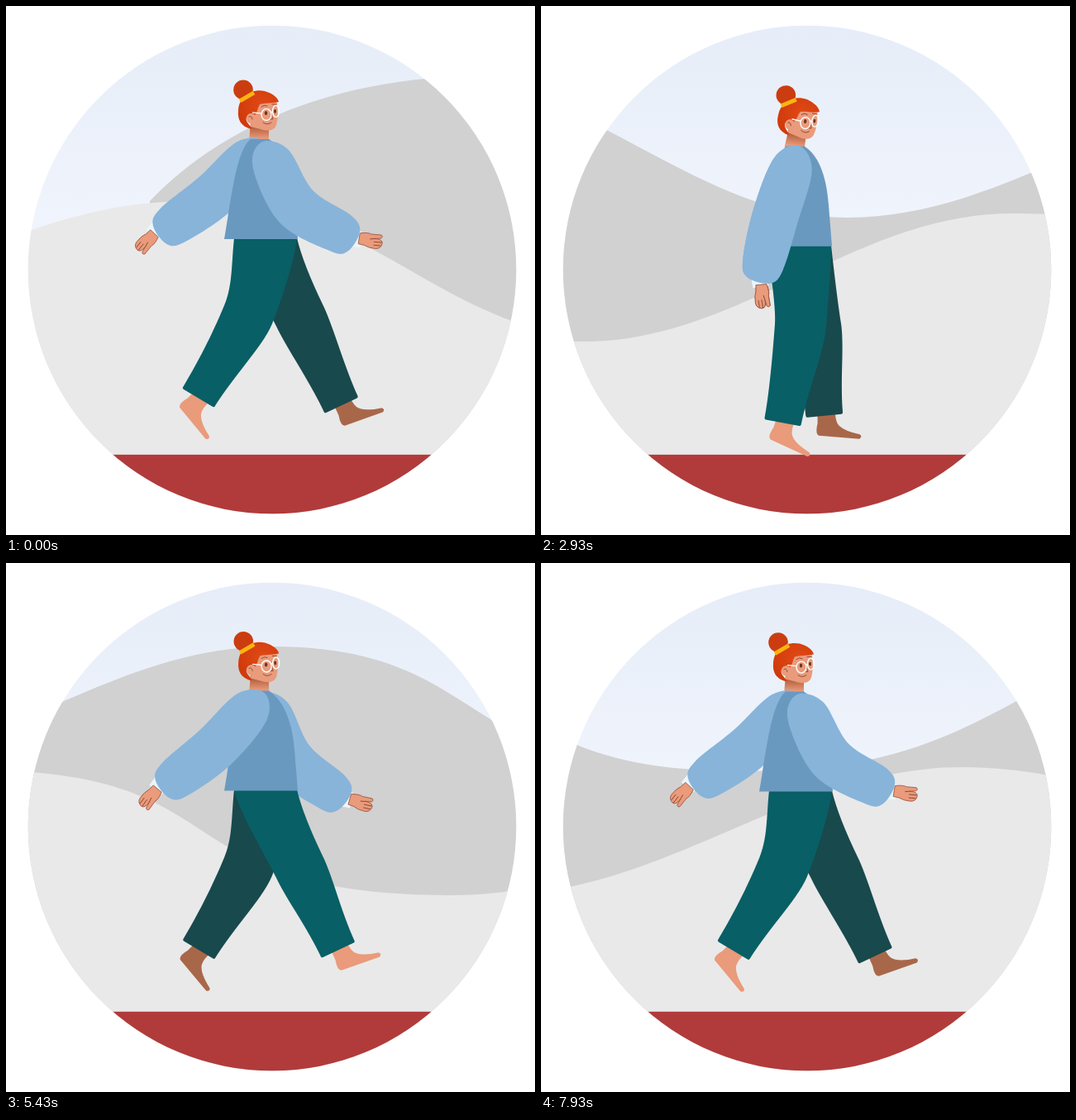
An HTML page that plays this animation: 640x640 px, repeating every 8 s.

```html
<!DOCTYPE html>
<html lang="en">
<head>
<meta charset="utf-8">
<title>Walking woman</title>
<style>
  html, body { margin: 0; width: 100%; height: 100%; overflow: hidden; background: #fff; }
  svg { display: block; width: 100vw; height: 100vh; }
  .pants { stroke-width: 4; stroke-linejoin: round; }
  .far .pants { fill: #18494d; stroke: #18494d; }
  .near .pants { fill: #085f65; stroke: #085f65; }
  .far .foot { fill: #a9674a; }
  .near .foot, .hand { fill: #e99b7b; }
  .hand { stroke: #9a5340; stroke-width: .8; stroke-linejoin: round; }
  .fingers, .ink { fill: none; stroke: #8a4630; stroke-width: .9; stroke-linecap: round; }
  .cuff { fill: #eaf6fb; }
  .sleeve { fill: #88b4d9; }
  .glasses { fill: none; stroke: #fff; stroke-width: 1.4; }
</style>
</head>
<body>
<svg viewBox="0 0 640 640">
  <defs>
    <clipPath id="disc"><circle cx="322" cy="319" r="295.3"/></clipPath>
    <linearGradient id="sky" gradientUnits="userSpaceOnUse" x1="0" y1="24" x2="0" y2="260">
      <stop offset="0" stop-color="#e6edf8"/><stop offset="1" stop-color="#f0f4fc"/>
    </linearGradient>
    <linearGradient id="neck" x1="0" y1="0" x2="0" y2="1">
      <stop offset=".25" stop-color="#b5603f"/><stop offset=".85" stop-color="#e99b7b"/>
    </linearGradient>
    <radialGradient id="hair" cx=".6" cy=".4" r=".7">
      <stop offset="0" stop-color="#e04a16"/><stop offset="1" stop-color="#cf380a"/>
    </radialGradient>
    <path id="footShape" d="M-9,-8 L-7,12 Q-9,25 -4,26.500 L45,26 Q49,23 45,20.500 Q23,18 17,10 Q13,4 13,-8Z"/>
    <g id="handShape">
      <rect class="cuff" x="-24" y="-10" width="12" height="19"/>
      <path class="hand" d="M-14,-8 Q-4,-10 0,-8 L12,-8 Q15,-6 12,-4 L5,-3 Q14,-3 14,2 Q13,9 6,9 Q-2,9 -8,6 L-15,5Z"/>
      <path class="fingers" d="M5,-3 L-1,-2 M13,1 L4,1 M12,5 L4,5"/>
    </g>
  </defs>

  <g clip-path="url(#disc)">
    <rect width="640" height="640" fill="url(#sky)"/>
    <g id="hills">
      <path fill="#d1d1d1" d="M174,236 C265,140 410,85 572,85 C755,85 893,256 1076,256 C1277,256 1428,101 1629,101
        C1890,101 1850,251 2140,251 C2350,258 2440,195 2600,100 V640 H174Z"/>
      <path fill="#e9e9e9" d="M-40,300 C60,255 140,236 225,236 C460,236 522,406 757,406 C946,406 1087,251 1276,251
        C1600,251 1490,402 1850,402 C2062,402 2213,247 2421,247 C2500,247 2570,265 2640,285 V640 H-40Z"/>
    </g>
    <rect y="542.800" width="640" height="98" fill="#b03b3a"/>
  </g>

  <g id="head">
    <path d="M296,140 L318,142 L318,163 L294,163Z" fill="url(#neck)"/>
    <path d="M298,117 L327,112 C329,122 330,132 327,143 C325,150 316,151 308,148 L296,145Z" fill="#e99b7b"/>
    <circle cx="287" cy="100.500" r="11.800" fill="#cb3d10"/>
    <path d="M281,126 C282,107 298,99 313,102 C323,105 329,110 330,115 C321,117 312,116 307,118 C304,123 304,129 301,131 C297,126 289,131 291,138 C293,143 297,144 297,148 C284,145 280,136 281,126Z" fill="url(#hair)"/>
    <path d="M283,114 L300,104" stroke="#fbb40e" stroke-width="5"/>
    <ellipse cx="296" cy="135" rx="5" ry="6" fill="#e99b7b"/>
    <path class="ink" d="M294,133 Q297,131 298,136 M309,121 Q312,118 316,120 M322,118 L327,118 M311,140 Q316,144 321,140 M321,130 L323,136 L320,136"/>
    <ellipse cx="314.500" cy="128.500" rx="1.700" ry="2.500" fill="#6b3520"/>
    <ellipse cx="325.500" cy="126.500" rx="1.500" ry="2.400" fill="#6b3520"/>
    <g class="glasses">
      <ellipse cx="315" cy="130.500" rx="6" ry="7"/>
      <ellipse cx="326.500" cy="126.500" rx="4" ry="7"/>
      <path d="M298,128 L309,129 M320,128 L323,127"/>
    </g>
  </g>

  <g class="far arm"><use href="#handShape"/><path class="sleeve"/></g>
  <g class="far leg"><use class="foot" href="#footShape"/><path class="pants"/></g>
  <g class="near leg"><use class="foot" href="#footShape"/><path class="pants"/></g>
  <path id="torso" fill="#6a99c0"/>
  <g class="near arm"><use href="#handShape"/><path class="sleeve"/></g>
</svg>

<script>
const LOOP = 8000, STRIDE = 4050, FPS = 14, SCROLL = 0.241;
const RAD = Math.PI / 180;
const $ = s => document.querySelector(s);

const lerp = (a, b, u) => a + (b - a) * u;
const ease = (a, b, v) => {
  const u = Math.min(1, Math.max(0, (v - a) / (b - a)));
  return u * u * (3 - 2 * u);
};
const add = (p, d, k = 1) => [p[0] + d[0] * k, p[1] + d[1] * k];
const normal = d => [d[1], -d[0]];
// Direction of a limb hanging down, swung forward by some degrees
const hang = deg => [Math.sin(deg * RAD), Math.cos(deg * RAD)];
const text = pts => pts.map(p => p.map(v => v.toFixed(1)).join()).join(' ');

function closedCurve(pts) {
  const n = pts.length, at = i => pts[(i + n) % n];
  return 'M' + text([pts[0]]) + pts.map((p, i) => 'C' + text([
    add(p, add(at(i + 1), at(i - 1), -1), 1 / 6),
    add(at(i + 1), add(at(i + 2), p, -1), -1 / 6),
    at(i + 1)])).join('') + 'Z';
}

function drawLeg(group, phase, hem, hipX) {
  const swing = ease(.06, .33, phase) - ease(.54, .85, phase);
  const lift = Math.max(0, Math.sin(2 * Math.PI * phase));
  const thighTurn = lerp(-13.5, 26.5, swing), shinTurn = lerp(-31, 25, swing);
  const thigh = hang(thighTurn), shin = hang(shinTurn);
  const mid = hang((thighTurn + shinTurn) / 2), slack = hang(thighTurn / 2);
  const knee = add([hipX, hem + 8], thigh, lerp(86, 97, swing));
  const ankle = add(knee, shin, 115.5 - 11 * lift);

  const edge = side => {
    const top = [hipX + 1 + 36 * side, hem - 1];
    const k = add(knee, normal(mid), 29 * side), c = add(ankle, normal(shin), 20.5 * side);
    return [top, add(top, slack, 28), add(k, mid, -28), k, add(k, mid, 28), add(c, shin, -40), c];
  };
  const left = edge(-1), right = edge(1).reverse();
  group.querySelector('.pants').setAttribute('d',
    `M${text(left.slice(0, 1))}C${text(left.slice(1))}L${text(right.slice(0, 1))}C${text(right.slice(1))}Z`);
  group.querySelector('.foot').setAttribute('transform',
    `translate(${text([ankle])}) rotate(${lerp(51, -19, swing)})`);
}

function drawArm(group, phase, hem) {
  const swing = 1 - ease(0, .37, phase) + ease(.62, .88, phase);
  const upperTurn = lerp(-43.7, 28.5, swing), foreTurn = lerp(-53.7, 59, swing);
  const upper = hang(upperTurn), fore = hang(foreTurn), mid = hang((upperTurn + foreTurn) / 2);
  const shoulder = [lerp(297, 320, swing), hem + lerp(-101, -97, swing)];
  const elbow = add(shoulder, upper, 66), wrist = add(elbow, fore, 62);
  const side = k => [
    add(shoulder, normal(upper), 24 * k), add(elbow, normal(mid), 28 * k),
    add(wrist, normal(fore), 25 * k), add(add(wrist, fore, 19), normal(fore), 14 * k)];
  group.querySelector('.sleeve').setAttribute('d',
    closedCurve([add(shoulder, upper, -23), ...side(1), ...side(-1).reverse()]));

  const back = (1 - swing) ** 4;
  const reach = 17 + foreTurn - 21 * back;
  group.querySelector('use').setAttribute('transform',
    `translate(${text([add(wrist, hang(reach), 38)])}) rotate(${81 - reach - 10 * back})`);
}

function drawBody(hem, shift, neck, tilt) {
  const y = v => hem + v;
  $('#torso').setAttribute('d', `M${264 + shift},${y(0)} C${272 + shift},${y(-45)} ${278 + neck},${y(-107)} ${296 + neck},${y(-121)}
    L${318 + neck},${y(-121)} C${338 + neck},${y(-108)} ${347 + shift},${y(-78)} ${349 + shift},${y(-50)} L${353 + shift},${y(0)}Z`);
  $('#head').setAttribute('transform', `translate(${neck},${hem - 281}) rotate(${tilt} 307 160)`);
}

function render(ms) {
  const t = Math.floor((ms % LOOP + 5) * FPS / 1000) * 1000 / FPS;
  const step = 4 * Math.PI * t / STRIDE;
  const pulse = deg => Math.max(0, Math.cos(step - deg * RAD)) ** 2;
  const hem = 284.5 + 11.5 * Math.cos(step - 103 * RAD);
  const shift = -9 * pulse(90), tilt = 8 * pulse(165);

  $('#hills').setAttribute('transform', `translate(${-SCROLL * t})`);
  drawBody(hem, shift, .7 * shift + .2 * tilt, tilt);
  for (const [name, offset] of [['near', 0], ['far', .5]]) {
    const phase = (t / STRIDE + offset) % 1;
    drawLeg($(`.${name}.leg`), phase, hem, 313 + shift);
    drawArm($(`.${name}.arm`), phase, hem);
  }
}

const start = performance.now();
function tick() {
  render(performance.now() - start);
  requestAnimationFrame(tick);
}
tick();
</script>
</body>
</html>
```
